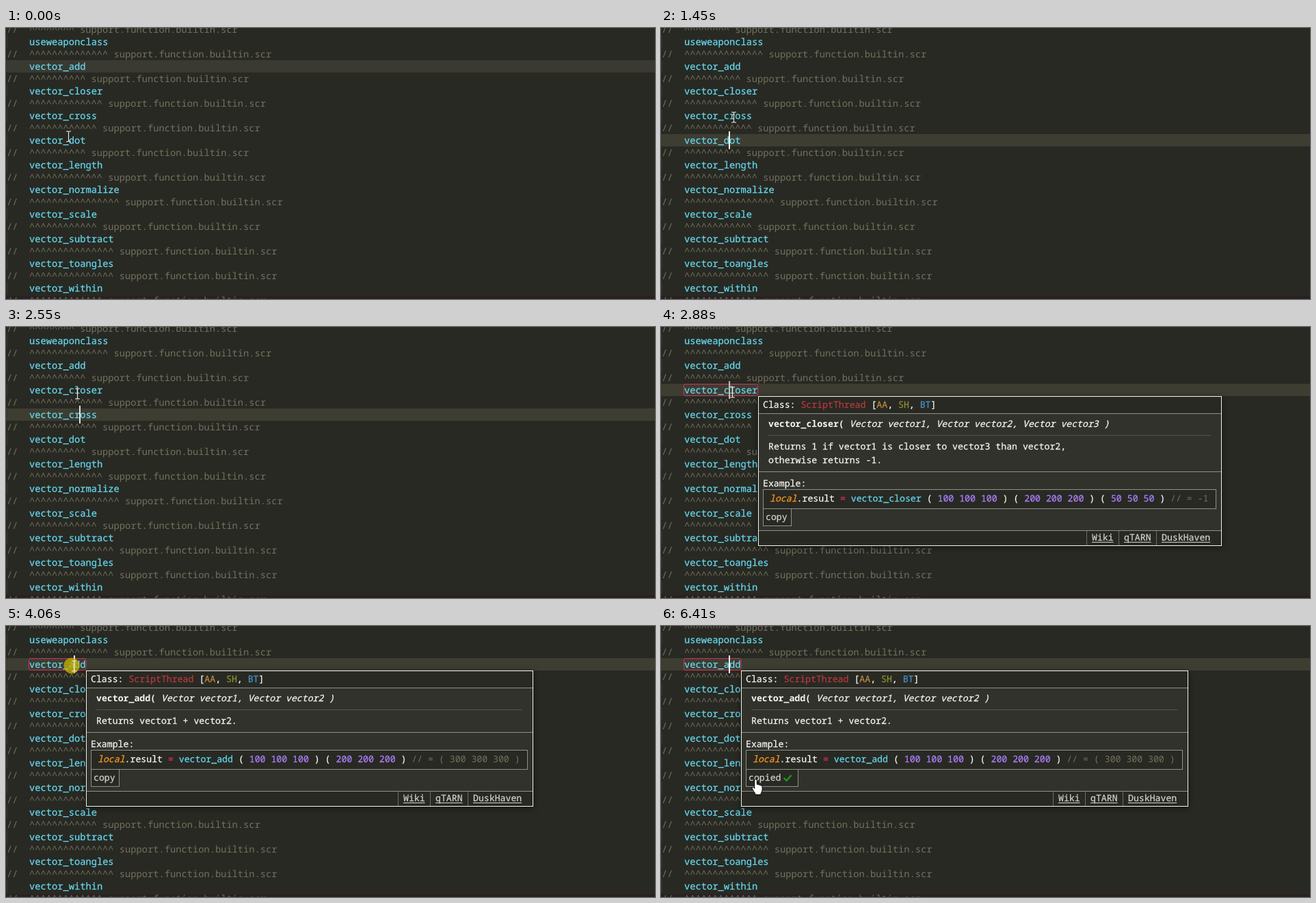
An HTML page that plays this animation: 949x396 px, repeating every 7.21 s.

```html
<!DOCTYPE html>
<html lang="en">
<head>
<meta charset="utf-8">
<title>Function hover help</title>
<style>
  html, body { margin: 0; width: 100%; height: 100%; overflow: hidden; background: #282923; }
  svg { display: block; width: 949px; height: 396px; }
  text { font-family: "Noto Sans Mono", "DejaVu Sans Mono", monospace; white-space: pre; text-rendering: geometricPrecision;
    color: #f8f8f2; fill: currentColor; stroke: currentColor; stroke-width: .25px; }
  .editor text { font-size: 13.745px; }
  .popup text { font-size: 13.2px; }
  .popup { filter: drop-shadow(0 2px 4px rgba(0,0,0,.5)); }
  text.fn { color: #66d9ef; }
  text.note { color: #75715e; stroke: none; }
  text.num { color: #ae81ff; }
  text.op { color: #f92672; }
  text.local { color: #fd971f; font-style: italic; }
  text.bold { font-weight: 700; stroke: none; }
  text.it { font-style: italic; }
  text.soft { color: #d2d2cc; }
  text.red { color: #b73a3c; }
  text.aa { color: #c08a3e; }
  text.sh { color: #8f8f35; }
  text.bt { color: #4a8fc4; }
</style>
</head>
<body>
<svg id="stage" viewBox="0 0 949 396"></svg>
<script>
const LOOP = 7210, TICK = 68.83;
const ED = 8.247, POP = 7.92, INDENT = 34;
const BG = '#282923', PANEL = '#31322c', LINE = '#8f908a';
const stage = document.getElementById('stage');

function add(parent, tag, attrs, text) {
  const el = document.createElementNS('http://www.w3.org/2000/svg', tag);
  for (const k in attrs) el.setAttribute(k, attrs[k]);
  if (text !== undefined) el.textContent = text;
  parent.appendChild(el);
  return el;
}
const rect = (p, x, y, width, height, fill, more) =>
  add(p, 'rect', { x, y, width, height, fill, ...more });
const box = (p, x, y, w, h, fill, stroke) =>
  rect(p, x + .5, y + .5, w - 1, h - 1, fill, { stroke });
const show = (el, on) => el.setAttribute('visibility', on ? 'visible' : 'hidden');

// Runs of [class, text] on a fixed character grid
function runs(p, x, y, advance, list) {
  for (const [cls, s] of list) {
    const lead = s.length - s.trimStart().length;
    if (s.trim()) add(p, 'text', { x: x + lead * advance, y, class: cls }, s.trim());
    x += s.length * advance;
  }
}

// Editor
const names = ['useweaponclass', 'vector_add', 'vector_closer', 'vector_cross', 'vector_dot',
  'vector_length', 'vector_normalize', 'vector_scale', 'vector_subtract', 'vector_toangles', 'vector_within'];
const rowTop = i => 11 + 36 * i;
const editor = add(stage, 'g', { class: 'editor' });
rect(editor, 0, 0, 949, 396, BG);
rect(editor, 0, 392, 949, 4, '#2a2022');
const band = rect(editor, 0, 0, 949, 18, BG);

function comment(count, base) {
  runs(editor, 1, base, ED, [['note', '//  ' + '^'.repeat(count) + ' support.function.builtin.scr']]);
}
comment(8, 7);
names.forEach((name, i) => {
  const y = rowTop(i);
  rect(editor, 1, y, 1, 18, '#36372f');
  runs(editor, INDENT, y + 14, ED, [['fn', name]]);
  comment(name.length, y + 32);
});

// Help popups
function highlight(code) {
  return code.match(/\/\/.*|local|\w+_\w+|\d+|=|[^\d=\/]+?(?=\/\/|local|\w+_|\d|=|$)/g).map(s => [
    s.startsWith('//') ? 'note' : s === 'local' ? 'local' : s === '=' ? 'op' :
    /^\d/.test(s) ? 'num' : s.includes('_') ? 'fn' : '', s]);
}

function makePopup(row, args, lines, code) {
  const name = names[row], word = name.length * ED;
  const left = Math.ceil(INDENT + word), top = rowTop(row) + 18;
  const w = Math.round(35 + code.length * POP), extra = 20 * (lines.length - 1);
  const root = add(stage, 'g', { visibility: 'hidden' });
  rect(root, 33.5, top - 17.5, word + 1, 17, 'none', { rx: 2, stroke: '#d4305f' });
  const g = add(root, 'g', { class: 'popup', transform: `translate(${left} ${top})` });
  box(g, 0, 0, w + 1, 199 + extra, PANEL, '#f4f4ee');
  rect(g, 1, 1, w - 1, 24, BG);
  runs(g, 7, 17, POP, [['', 'Class: '], ['red', 'ScriptThread'], ['', ' ['], ['aa', 'AA'], ['', ', '],
    ['sh', 'SH'], ['', ', '], ['bt', 'BT'], ['', ']']]);
  rect(g, 1, 25, w - 1, 1, LINE);
  runs(g, 15, 45, POP, [['bold', name + '('], ['it', ' ' + args + ' )']]);
  rect(g, 15, 57, w - 30, 1, '#53544d');
  lines.forEach((s, i) => runs(g, 15, 78 + 20 * i, POP, [['', s]]));

  const low = add(g, 'g', { transform: `translate(0 ${extra})` });
  rect(low, 1, 90, w - 1, 1, LINE);
  runs(low, 7, 112, POP, [['', 'Example:']]);
  box(low, 7, 116, w - 14, 29, BG, LINE);
  runs(low, 17, 134, POP, highlight(code));
  const button = (label, width) => {
    const b = add(low, 'g', {});
    box(b, 7, 144, width, 26, BG, LINE);
    runs(b, 11, 161, POP, [['soft', label]]);
    return b;
  };
  const copy = button('copy', 42), copied = button('copied', 77);
  add(copied, 'path', { d: 'M62.5 157l4 4 7-8', fill: 'none', stroke: '#1c9a1c', 'stroke-width': 2.4 });
  rect(low, 1, 176, w - 1, 1, LINE);
  rect(low, 1, 177, w - 1, 21, BG);
  let x = w - 16;
  for (const s of ['DuskHaven', 'qTARN', 'Wiki']) {
    const len = s.length * POP;
    x = Math.round(x - len);
    rect(low, x - 8, 177, 1, 21, '#6d6e67');
    runs(low, x, 191, POP, [['soft', s]]);
    rect(low, x, 193, len, 1, '#d2d2cc');
    x -= 15;
  }
  return { root, copy, copied };
}

const pair = 'Vector vector1, Vector vector2';
const popups = {
  4: makePopup(4, pair, ['Returns dot product of vector1 and vector2.'],
    'local.result = vector_dot ( 10 20 30 ) ( 4 5 6 ) // = 320.0'),
  3: makePopup(3, pair, ['Returns cross product of vector1 and vector2.'],
    'local.result = vector_cross ( 1 0 0 ) ( 0 1 0 ) // = ( 0 0 1 )'),
  2: makePopup(2, pair + ', Vector vector3', ['Returns 1 if vector1 is closer to vector3 than vector2,', 'otherwise returns -1.'],
    'local.result = vector_closer ( 100 100 100 ) ( 200 200 200 ) ( 50 50 50 ) // = -1'),
  1: makePopup(1, pair, ['Returns vector1 + vector2.'],
    'local.result = vector_add ( 100 100 100 ) ( 200 200 200 ) // = ( 300 300 300 )')
};

// Caret, click mark and pointers
const caret = rect(stage, 0, 0, 2, 26, '#f8f8f0');
const mark = add(stage, 'circle', { r: 11.5, fill: '#c8b400', opacity: .75 });
const ibeam = add(stage, 'path', { d: 'M-3.5-7.5H-1L0-6.5 1-7.5H3.5M0-6.5V6.5M-3.5 7.5H-1L0 6.5 1 7.5H3.5',
  fill: 'none', stroke: '#f0f0ea', 'stroke-width': 1.1 });
const solid = d => add(stage, 'path', { d, fill: '#fff', stroke: '#000', 'stroke-width': 1, 'stroke-linejoin': 'round' });
const arrow = solid('M0 0V16.5L3.8 13 6.3 18.6 8.8 17.5 6.3 12H11.5Z');
const hand = solid('M-1.8 1.5Q-1.8-.6 0-.6T1.8 1.5V7Q3.6 6 4.6 7.8 6.4 7 7.2 8.6 9.6 8 9.6 10.5V15Q9.4 18 7.6 20V22H-.8V20Q-3 17.5-5 13.5-5.8 11.4-4.4 11T-1.8 13Z');

// The pointer goes to x, y between start and end, then clicks; a row click opens its popup
const home = { x: 91, y: 158 };
const moves = [
  { start: 70, end: 210, click: 210, x: 99, y: 164, row: 4 },
  { start: 620, end: 1380, click: 1520, x: 106, y: 130, row: 3 },
  { start: 2060, end: 2620, click: 2620, x: 104, y: 95, row: 2 },
  { start: 3080, end: 3860, click: 3930, x: 99, y: 58, row: 1 },
  { start: 4460, end: 5160, click: 5510, x: 138, y: 224, bend: 45 }
];
const rowMoves = moves.filter(m => m.row);
const copyClick = moves[4].click;
const OPEN = 70, LEAVE = 210, PRESS = 200, BLINK = 1200;
const clamp = v => Math.min(1, Math.max(0, v));

function pointer(t) {
  let { x, y } = home;
  for (const m of moves) {
    const p = clamp((t - m.start) / (m.end - m.start)) ** 1.2;
    const e = p * p * (3 - 2 * p);
    x += (m.x - x) * e + (m.bend || 0) * Math.sin(Math.PI * e);
    y += (m.y - y) * e;
  }
  return { x, y };
}

function draw(ms) {
  const t = Math.floor((ms % LOOP + 6) / TICK) * TICK + 10;
  const last = rowMoves.filter(m => m.click <= t).pop();
  const top = rowTop(last ? last.row : 1);
  band.setAttribute('y', top);
  band.setAttribute('fill', last ? '#3e3d32' : '#3a3932');

  rowMoves.forEach((m, i) => {
    const p = popups[m.row], next = rowMoves[i + 1];
    const on = t >= m.click + OPEN && (!next || t < next.start + LEAVE);
    const done = t >= copyClick + OPEN;
    show(p.root, on);
    show(p.copy, on && !done);
    show(p.copied, on && done);
  });

  show(caret, last);
  if (last) {
    const col = Math.round((last.x - INDENT) / ED);
    caret.setAttribute('x', Math.round(INDENT + col * ED) - 1);
    caret.setAttribute('y', top - 4);
    caret.setAttribute('opacity', clamp(.3 + .9 * Math.cos(2 * Math.PI * (t - last.click) / BLINK)));
  }

  const { x, y } = pointer(t);
  const kind = t < moves[4].start || x < 117 ? ibeam : y > 209 && x < 166 ? hand : arrow;
  for (const c of [ibeam, arrow, hand]) {
    show(c, c === kind);
    c.setAttribute('transform', `translate(${Math.round(x) + .5} ${Math.round(y) + .5})`);
  }
  show(mark, moves.some(m => t >= m.click && t < m.click + PRESS));
  mark.setAttribute('cx', x - (kind === ibeam ? 3 : 0));
  mark.setAttribute('cy', y);
}

const start = performance.now();
function loop() {
  draw(performance.now() - start);
  requestAnimationFrame(loop);
}
loop();
</script>
</body>
</html>
```
